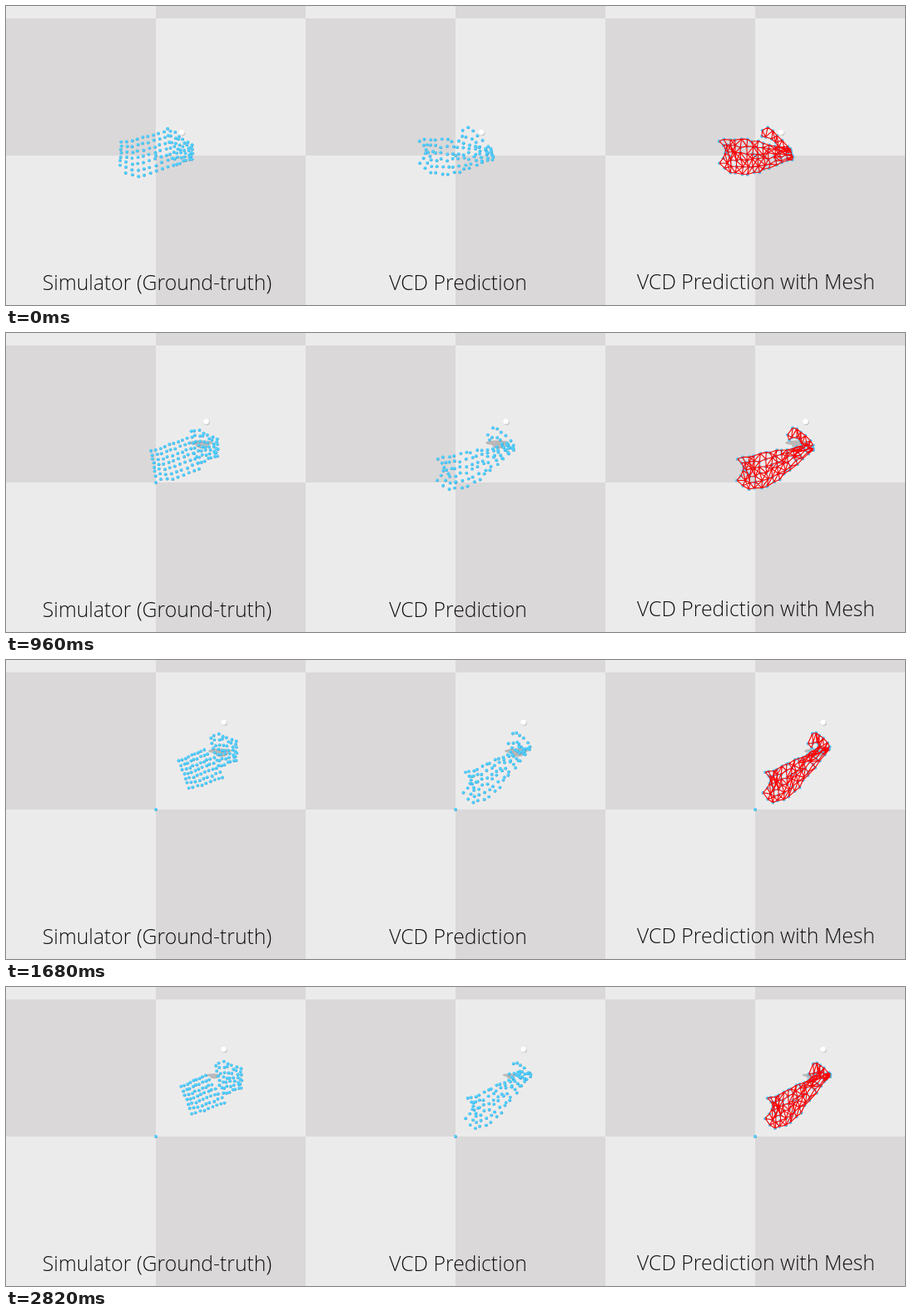
Recreate the animation shown at these times as an HTML page. Size 1080 by 360 pixels, loop 2.85 s.

```html
<!DOCTYPE html>
<html lang="en">
<head>
<meta charset="utf-8">
<title>Cloth prediction</title>
<style>
  html, body { margin: 0; width: 100%; height: 100%; overflow: hidden; background: #ecebeb; }
  svg { display: block; width: 1080px; height: 360px; }
  text { font: 300 24.75px "Open Sans", sans-serif; fill: #111; text-anchor: middle; }
</style>
</head>
<body>
<svg id="stage" viewBox="0 0 1080 360">
  <defs>
    <radialGradient id="dot" cx=".42" cy=".4" r=".65">
      <stop offset="0" stop-color="#62d8ff"/>
      <stop offset=".65" stop-color="#42c6fa"/>
      <stop offset="1" stop-color="#1f80b0"/>
    </radialGradient>
    <radialGradient id="ball" cx=".4" cy=".36" r=".68">
      <stop offset=".5" stop-color="#fff"/>
      <stop offset=".8" stop-color="#e2e2e2"/>
      <stop offset="1" stop-color="#a2a0a0"/>
    </radialGradient>
    <g id="floor">
      <path fill="#ecebeb" d="M0 0H360V360H0z"/>
      <path fill="#dad8d9" d="M180 0H360V15H180zM0 15H180V180H0zM180 180H360V360H180z"/>
    </g>
  </defs>
</svg>
<script>
const LOOP = 2850, STEP = 30, RELEASE = 1680, REST = 1740;

const svg = document.getElementById("stage");
function set(el, attrs) {
  for (const k in attrs) el.setAttribute(k, attrs[k]);
}
function add(parent, tag, attrs, text) {
  const el = document.createElementNS("http://www.w3.org/2000/svg", tag);
  set(el, attrs);
  if (text) el.textContent = text;
  return parent.appendChild(el);
}
const mix = (a, b, k) => a + (b - a) * k;
const ramp = (t, from, to) => Math.max(0, Math.min(1, (t - from) / (to - from)));
const smooth = k => k * k * (3 - 2 * k);
const settle = t => smooth(ramp(t, RELEASE, LOOP));

let seed = 17;
const rand = () => (seed = seed * 16807 % 2147483647) / 2147483647;
const wobble = size => (rand() * 2 - 1) * size;

// Point in a quad (corners TL, TR, BL, BR) whose upper and lower edges sag
function inQuad({ corners: [tl, tr, bl, br], sag }, u, v) {
  const [x, y] = [0, 1].map(c => mix(mix(tl[c], tr[c], u), mix(bl[c], br[c], u), v));
  return [x, y + mix(sag[0], sag[1], v) * Math.sin(Math.PI * u ** .65)];
}

// Each node is dragged from one quad to the other; the far end (u = 0) starts late
function sheet({ cols, rows, jitter, lag, from, to, drop = [0, 0], notch = 0 }) {
  const nodes = [], links = [];
  for (let r = 0; r < rows; r++)
    for (let c = 0; c < cols; c++) {
      const u = c / (cols - 1), v = r / (rows - 1), i = nodes.length;
      const dent = notch * Math.max(0, 1 - 5 * u) * Math.sin(Math.PI * v);
      const shift = [wobble(jitter) + dent, wobble(jitter)];
      const spot = quad => inQuad(quad, u, v).map((n, k) => n + shift[k]);
      nodes.push({ a: spot(from), b: spot(to), wait: lag * (1 - u) });

      const right = c < cols - 1, down = r < rows - 1;
      if (right) links.push([i, i + 1]);
      if (down) links.push([i, i + cols]);
      if (right && down && rand() < .6) links.push([i, i + cols + 1]);
      if (right && down && rand() < .6) links.push([i + 1, i + cols]);
    }
  const place = t => nodes.map(({ a, b, wait }) => {
    const k = ramp(t, wait, REST), fall = settle(t);
    return [0, 1].map(c => (mix(a[c], b[c], k) + drop[c] * fall).toFixed(1));
  });
  return { nodes, links, place };
}

const sim = [
  sheet({
    cols: 9, rows: 7, jitter: .7, lag: 190,
    from: { corners: [[139, 164], [190, 151], [137, 191], [195, 193]], sag: [1, 13] },
    to: { corners: [[211, 120], [240, 106], [223, 152], [263, 139]], sag: [0, 1] }
  }),
  sheet({
    cols: 7, rows: 7, jitter: 1.5, lag: 90, drop: [4, 3],
    from: { corners: [[193, 149], [222, 167], [200, 191], [224, 184]], sag: [-2, 0] },
    to: { corners: [[247, 93], [277, 95], [256, 124], [279, 118]], sag: [-6, 1] }
  })
];
const pred = [
  sheet({
    cols: 14, rows: 6, jitter: 1.6, lag: 480, notch: 8,
    from: { corners: [[137, 164], [222, 173], [137, 188], [225, 184]], sag: [-6, 15] },
    to: { corners: [[195, 135], [257, 103], [192, 157], [271, 104]], sag: [2, 25] }
  }),
  sheet({
    cols: 7, rows: 2, jitter: 1.4, lag: 80, drop: [-1, 6],
    from: { corners: [[189, 149], [224, 175], [188, 157], [220, 178]], sag: [-7, -3] },
    to: { corners: [[246, 98], [272, 101], [250, 104], [265, 109]], sag: [-13, -8] }
  })
];

function panel(x, sheets, shadeX, label, labelX, labelY, withMesh) {
  const g = add(svg, "g", { transform: `translate(${x})` });
  add(g, "use", { href: "#floor" });
  const shadow = add(g, "g", { fill: "#b5b3b3" });
  add(shadow, "ellipse", { cy: -1.5, rx: 14, ry: 3 });
  add(shadow, "ellipse", { cx: 2, cy: 1.5, rx: 8, ry: 4 });
  const dot = () => add(g, "circle", { r: 1.95, fill: "url(#dot)" });
  set(dot(), { cx: 180, cy: 180 });
  const dots = sheets.map(s => s.nodes.map(dot));
  const mesh = withMesh && add(g, "path", { fill: "none", stroke: "#f00", "stroke-width": 1.1 });
  const ball = add(g, "circle", { r: 3.8, fill: "url(#ball)" });
  add(g, "text", { x: labelX, y: labelY }, label);

  return t => {
    const k = ramp(t, 0, RELEASE), bow = Math.sin(Math.PI * k), fall = settle(t);
    set(ball, { cx: 211.5 + 50.5 * k + .6 * bow, cy: 152.5 - 77 * k - 1.4 * bow });
    const sx = shadeX + 53 * k - 8 * fall, sy = 164 - 53 * k - 4 * fall;
    set(shadow, {
      transform: `translate(${sx} ${sy}) scale(${1 - .4 * fall})`,
      opacity: .9 * ramp(t, 200, 600)
    });

    let d = "";
    sheets.forEach((s, i) => {
      const pts = s.place(t);
      pts.forEach(([cx, cy], j) => set(dots[i][j], { cx, cy }));
      if (mesh) for (const [a, b] of s.links) d += `M${pts[a]}L${pts[b]}`;
    });
    if (mesh) set(mesh, { d });
  };
}

const panels = [
  panel(0, sim, 204, "Simulator (Ground-truth)", 181.5, 341.7),
  panel(360, pred, 200, "VCD Prediction", 183, 341.7),
  panel(720, pred, 200, "VCD Prediction with Mesh", 181, 340.7, true)
];

function render(ms) {
  const t = Math.floor(ms % LOOP / STEP) * STEP;
  panels.forEach(draw => draw(t));
}

const start = performance.now();
function tick() {
  render(performance.now() - start);
  requestAnimationFrame(tick);
}
tick();
</script>
</body>
</html>
```
